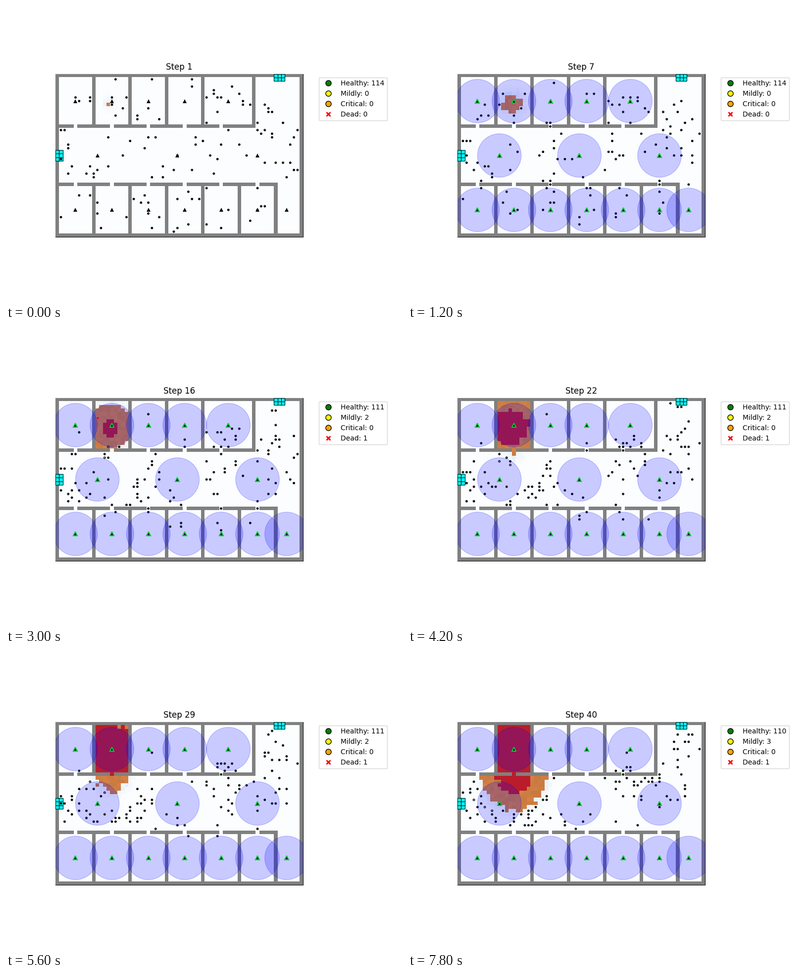
Recreate the animation shown at these times as a matplotlib script. Size 800x600 px, loop 8 s.

```python
import random

import matplotlib.pyplot as plt
import numpy as np
from matplotlib.animation import FuncAnimation
from matplotlib.lines import Line2D
from matplotlib.patches import Circle, Rectangle

COLS, ROWS, STEPS = 68, 45, 40
BURN_RATE, BURN_OUT = 0.42, 10          # cells per step, steps until red
ALARM, DEATH = 2, 14
VICTIM, CORNER = 4, (11, 5)             # who dies, and where
ILL_AT = {5: 10, 6: 12, 7: 33}          # person -> step of a mild injury
TAN = np.array([205, 125, 66]) / 255
RED = np.array([186, 28, 44]) / 255
MOVES = [(a, b) for a in (-1, 0, 1) for b in (-1, 0, 1) if a or b]


def build_walls():
    wall = np.zeros((ROWS, COLS), bool)
    wall[[0, 14, 30, 44]] = True
    wall[14, 55:] = wall[30, 61:] = False
    wall[:, [0, 67]] = True
    wall[:15, [10, 20, 30, 40, 54]] = True
    wall[30:, 10:61:10] = True
    wall[14, 5:46:10] = wall[30, 5:56:10] = False      # doors
    return wall


def ignition_times(wall, rng):
    """Step at which each cell catches fire."""
    r, c = np.mgrid[:ROWS, :COLS]
    in_room = 0.5 + np.hypot(c - 14.2, r - 7.7) / BURN_RATE
    in_hall = 18.5 + np.hypot(c - 15, 0.92 * (r - 14)) / BURN_RATE
    times = np.where((c > 10) & (c < 20) & (r < 14), in_room, np.inf)
    times = np.where((r > 14) & (r < 30), in_hall, times)
    times = np.maximum(times + rng.uniform(-1.4, 1.4, times.shape), 2)
    times[wall] = np.inf
    times[14, 15] = 19
    times[8, 14] = 1
    return times


def exit_distance(wall, ignite):
    """Walking cost to the nearest exit, dearer around the fire."""
    row = np.arange(ROWS)[:, None]
    cost = 1 + 3.0 * (ignite < 8) + 2.0 * ((row > 14) & (ignite < 42))
    cost[wall] = np.inf
    dist = np.full(wall.shape, np.inf)
    dist[21:24, 1] = dist[1, 60:63] = 0
    for _ in range(150):
        for a, b in MOVES:
            dist = np.minimum(dist, np.roll(dist, (a, b), (0, 1)) + cost * np.hypot(a, b))
    return dist


def crowd(rng):
    """Scatter a given number of people over each room and part of the hall."""
    people = []

    def fill(n, left, right, top, bottom):
        cells = [(c, r) for c in range(left, right) for r in range(top, bottom)]
        people.extend(rng.sample(cells, n))

    for k, n in enumerate((4, 6, 5, 2)):
        fill(n, 10 * k + 1, 10 * k + 10, 1, 14)
    fill(12, 41, 54, 3, 14)
    for k, n in enumerate((3, 4, 7, 7, 4, 5)):
        fill(n, 10 * k + 1, 10 * k + 10, 31, 44)
    fill(22, 1, 31, 15, 30)
    fill(13, 31, 54, 15, 30)
    fill(21, 55, 67, 8, 30)
    return people


def next_cell(cell, step, pace, taken, rng):
    """One step towards an exit, a stroll aside, or a pause."""
    c, r = cell
    burning = ignite[r, c] <= step
    urgent = ignite[r, c] < step + 3
    in_room = (r < 15 and c < 40) or r > 29
    free = [(c + a, r + b) for a, b in MOVES
            if not wall[r + b, c + a] and (c + a, r + b) not in taken
            and (burning or ignite[r + b, c + a] > step)]
    ahead = [p for p in free if dist[p[1], p[0]] < dist[r, c]]
    u = rng.random()
    if ahead and (urgent or u < pace * (1 if in_room else 0.45)):
        return rng.choice(ahead)
    if free and u > (0.9 if in_room else 0.7):
        return rng.choice(free)
    return cell


def simulate():
    """Positions and fill colours of the people for every step."""
    rng = random.Random(11)
    people = dict(enumerate(crowd(rng)))
    fill = [rng.choice(("green", "#10101c", "#10101c")) for _ in people]
    pace = [rng.uniform(0.5, 1) for _ in people]
    history = []
    for step in range(1, STEPS + 1):
        taken = set(people.values())
        for i, cell in list(people.items()) if step > 1 else []:
            taken.discard(cell)
            if dist[cell[1], cell[0]] == 0 or (i == VICTIM and step >= DEATH):
                del people[i]
                continue
            if i == VICTIM:
                people[i] = tuple(int(p + np.sign(q - p)) for p, q in zip(cell, CORNER))
            else:
                people[i] = next_cell(cell, step, pace[i], taken, rng)
            taken.add(people[i])
        colors = ["lightyellow" if step >= ILL_AT.get(i, 99) else fill[i] for i in people]
        history.append((np.array(list(people.values())) + 0.5, colors))
    return history


rng = np.random.default_rng(5)
wall = build_walls()
ignite = ignition_times(wall, rng)
dist = exit_distance(wall, ignite)
history = simulate()
shade = rng.uniform(0.97, 1.04, (ROWS, COLS, 1))
haze = rng.uniform(0.5, 1, (ROWS, COLS))

fig, ax = plt.subplots(figsize=(8, 6), dpi=100)
fig.subplots_adjust(left=0.125, right=0.75, bottom=0.11, top=0.88)
view = dict(extent=(0, COLS, ROWS, 0), interpolation="nearest")
smoke = ax.imshow(np.zeros((ROWS, COLS)), cmap="Blues", vmin=0, vmax=1,
                  alpha=0.3, zorder=0, **view)
fire = ax.imshow(np.zeros((ROWS, COLS, 4)), zorder=1, **view)
bricks = np.full((ROWS, COLS, 4), 128 / 255)
bricks[..., 3] = wall
ax.imshow(bricks, zorder=3, **view)
ax.set(xticks=[], yticks=[], xlim=(0, COLS), ylim=(ROWS, 0), aspect="equal")

for left, top, w, h in ((0, 21, 2, 3), (60, 0, 3, 2)):
    for c in range(left, left + w):
        for r in range(top, top + h):
            ax.add_patch(Rectangle((c, r), 1, 1, fc="cyan", ec="black", lw=0.8, zorder=3.5))

dots = ax.scatter([], [], s=6, edgecolors="black", linewidths=1, zorder=4)
dead, = ax.plot(CORNER[0] + 0.5, CORNER[1] + 0.5, "X", color="red", ms=3.2, mew=0, zorder=4)
places = ([(c, 7) for c in (5, 15, 25, 35, 47)]
          + [(c, 22) for c in range(11, 56, 22)]
          + [(c, 37) for c in (*range(5, 56, 10), 63)])
xs, ys = np.array(places).T + 0.5
sensors, = ax.plot(xs, ys, "^", ls="none", mfc="black", ms=6, zorder=4.5)
zones = [ax.add_patch(Circle((x, y), 6, color="blue", alpha=0.2, zorder=5))
         for x, y in zip(xs, ys)]


def key(color, marker="o", edge="black"):
    return Line2D([], [], color="w", marker=marker, mfc=color, mec=edge, ms=8)


title = ax.set_title("Step 1")
legend = ax.legend([key("green"), key("yellow"), key("orange"), key("red", "X", "w")],
                   ["Healthy: 114", "Mildly: 0", "Critical: 0", "Dead: 0"],
                   loc="upper left", bbox_to_anchor=(1.05, 1))


def update(frame):
    step = frame + 1
    title.set_text(f"Step {step}")

    rgba = np.zeros((ROWS, COLS, 4))
    rgba[..., :3] = np.clip(TAN * shade, 0, 1)
    rgba[ignite + BURN_OUT <= step, :3] = RED
    rgba[..., 3] = ignite <= step
    fire.set_data(rgba)
    smoke.set_data(0.4 * haze * np.clip(1 - (ignite - step) / 8, 0, 1) ** 2)

    cells, colors = history[frame]
    dots.set_offsets(cells)
    dots.set_facecolors(colors)
    dead.set_visible(step >= DEATH)

    alarm = step >= ALARM
    sensors.set_markeredgecolor("lime" if alarm else "black")
    sensors.set_markeredgewidth(1.5 if alarm else 0)
    for zone in zones:
        zone.set_visible(alarm)

    mild = sum(step >= s for s in ILL_AT.values())
    died = int(step >= DEATH)
    counts = {"Healthy": 114 - mild - died, "Mildly": mild, "Critical": 0, "Dead": died}
    for text, (name, n) in zip(legend.get_texts(), counts.items()):
        text.set_text(f"{name}: {n}")
    return []


anim = FuncAnimation(fig, update, frames=STEPS, interval=200, repeat=True, repeat_delay=0)
plt.show()
```
